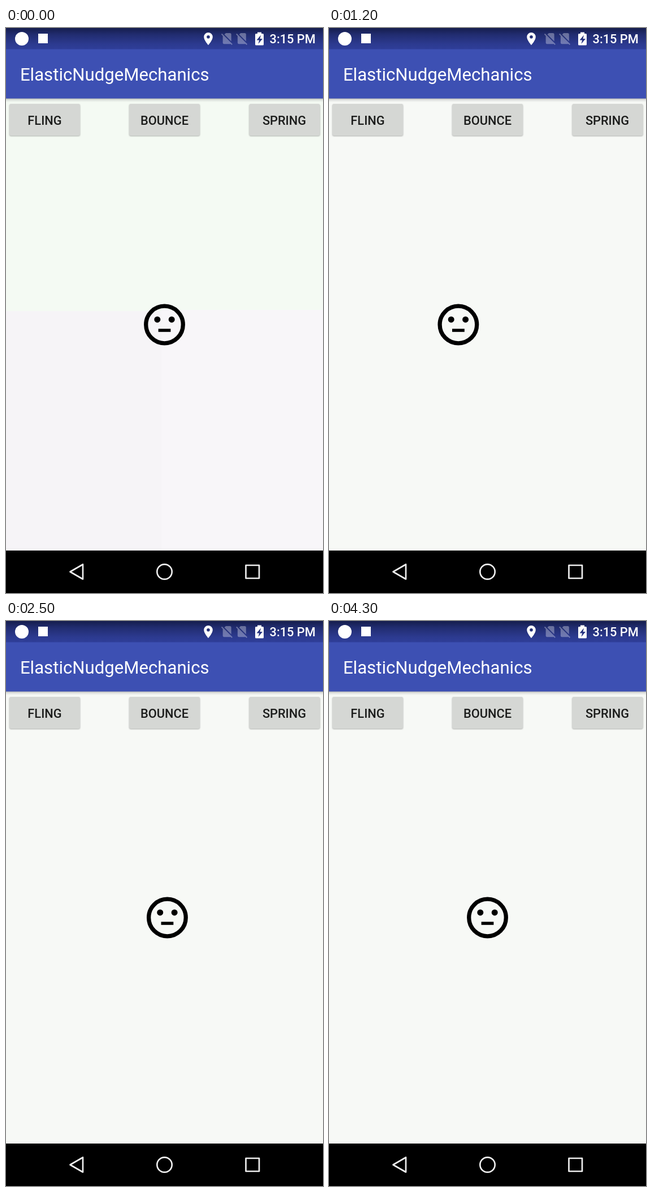
These frames come from a looping animation (561 by 998 pixels, 4400 ms). An HTML page:

```html
<!DOCTYPE html>
<html lang="en">
<head>
<meta charset="utf-8">
<title>Spring motion</title>
<style>
  html, body { margin: 0; width: 100%; height: 100%; overflow: hidden; background: #f7f9f6; }
  svg { display: block; width: 100%; height: 100%; }
  text { font-family: Roboto, sans-serif; }
  .title { font-size: 31.17px; fill: #fff; }
  .clock { font-size: 21.8px; font-weight: 500; fill: #fff; }
  .button rect { fill: #d5d7d4; filter: drop-shadow(0 1.2px 1.2px rgba(0, 0, 0, .3)); }
  .button text { font-size: 21.8px; font-weight: 500; fill: #1b1c1b; text-anchor: middle; }
  .nav { fill: none; stroke: #ededed; stroke-width: 2.7; stroke-linejoin: round; }
</style>
</head>
<body>
<svg viewBox="0 0 561 998" preserveAspectRatio="none">
  <defs>
    <linearGradient id="statusFill" x2="0" y2="1">
      <stop offset="0" stop-color="#151d4c"/>
      <stop offset=".3" stop-color="#212c6f"/>
      <stop offset=".75" stop-color="#2c3a8f"/>
      <stop offset="1" stop-color="#2f3e99"/>
    </linearGradient>
    <linearGradient id="barShadow" x2="0" y2="1">
      <stop offset="0" stop-opacity=".3"/>
      <stop offset=".4" stop-opacity=".1"/>
      <stop offset="1" stop-opacity="0"/>
    </linearGradient>
    <path id="noSim" fill="#fff" fill-opacity=".33" d="M18.99 5c0-1.1-.89-2-1.99-2h-7L7.66 5.34 19 16.68zM3.65 3.88 2.38 5.15 5 7.77V19c0 1.1.9 2 2 2h10c.35 0 .67-.1.96-.26l1.88 1.88 1.27-1.27z"/>
  </defs>

  <!-- content background -->
  <rect width="561" height="998" fill="#f7f9f6"/>
  <g id="tint">
    <rect y="125" width="561" height="375" fill="#f4faf3"/>
    <rect y="500" width="275" height="424" fill="#f6f4f7"/>
    <rect x="275" y="498" width="286" height="426" fill="#f8f6f9"/>
  </g>

  <!-- app bar -->
  <rect y="124" width="561" height="7" fill="url(#barShadow)"/>
  <rect y="37" width="561" height="87.5" fill="#3d50b3"/>
  <text class="title" x="24.9" y="93">ElasticNudgeMechanics</text>

  <!-- status bar -->
  <rect width="561" height="37.5" fill="url(#statusFill)"/>
  <circle cx="28" cy="19" r="12" fill="#fff"/>
  <rect x="57" y="10" width="17" height="17" fill="#fff"/>
  <path fill="#fff" fill-rule="evenodd" d="M358 8a7.8 7.8 0 0 0-7.8 7.8c0 5.8 7.8 14.4 7.8 14.4s7.8-8.6 7.8-14.4A7.8 7.8 0 0 0 358 8zm0 5a2.8 2.8 0 1 1 0 5.600a2.800 2.800 0 1 1 0-5.600z"/>
  <use href="#noSim" transform="translate(378.300 5.700) scale(1.070)"/>
  <use href="#noSim" transform="translate(404.500 5.700) scale(1.070)"/>
  <path fill="#fff" fill-rule="evenodd" d="M445 7.500h7v2.500h2.500q1.500 0 1.500 1.500v17.500q0 1.500-1.500 1.500h-12q-1.500 0-1.500-1.500v-17.500q0-1.500 1.500-1.500h2.500zM451 12.500 443.500 21.500h4.500l-1.500 6.500 7.500-9h-4.500z"/>
  <text class="clock" x="466.500" y="27">3:15 PM</text>

  <!-- buttons -->
  <g class="button">
    <rect x="6" y="134" width="125" height="56" rx="3"/>
    <text x="68.500" y="171">FLING</text>
  </g>
  <g class="button">
    <rect x="218" y="134" width="125" height="56" rx="3"/>
    <text x="280.500" y="171">BOUNCE</text>
  </g>
  <g class="button">
    <rect id="spring" x="430.500" y="134" width="125" height="56" rx="3"/>
    <text x="492.500" y="171">SPRING</text>
  </g>

  <g id="face" transform="translate(280.5 524)">
    <circle r="32.800" fill="none" stroke="#000" stroke-width="7.300"/>
    <circle cx="-12.700" cy="-9.100" r="5.500"/>
    <circle cx="12.700" cy="-9.100" r="5.500"/>
    <rect x="-10.900" y="7.300" width="21.800" height="5.500"/>
  </g>

  <!-- navigation bar -->
  <rect y="923" width="561" height="75"/>
  <g class="nav">
    <path d="M113.500 960.500 136 947.500v26z"/>
    <circle cx="280.500" cy="960.500" r="13.200"/>
    <rect x="424.500" y="949" width="23.500" height="23"/>
  </g>
</svg>
<script>
  const LOOP = 4400, STEP = 100;
  const PRESS = 500, LAUNCH = 615, REST = 3335;
  const CENTER = 280.5, VELOCITY = 1035;

  // Spring of stiffness 50 and damping ratio 0.2, flung from its rest position
  const OMEGA = Math.sqrt(50), ZETA = 0.2;
  const DAMPED = OMEGA * Math.sqrt(1 - ZETA * ZETA);

  const tint = document.getElementById('tint');
  const spring = document.getElementById('spring');
  const face = document.getElementById('face');

  function offset(ms) {
    if (ms < LAUNCH || ms > REST) return 0;
    const s = (ms - LAUNCH) / 1000;
    return VELOCITY / DAMPED * Math.exp(-ZETA * OMEGA * s) * Math.sin(DAMPED * s);
  }

  // Press highlight: quick rise, then a linear fade
  function shade(ms) {
    if (ms < PRESS || ms >= 1000) return 0;
    return ms < 600 ? 0.04 : 0.14 * (1000 - ms) / 400;
  }

  function draw(now) {
    const ms = Math.floor(now % LOOP / STEP) * STEP;
    const k = 1 - shade(ms);
    tint.style.display = ms < PRESS ? '' : 'none';
    spring.style.fill = `rgb(${213 * k}, ${215 * k}, ${212 * k})`;
    face.setAttribute('transform', `translate(${CENTER + offset(ms)} 524)`);
  }

  const start = performance.now();
  function tick() {
    draw(performance.now() - start);
    requestAnimationFrame(tick);
  }
  tick();
</script>
</body>
</html>
```
